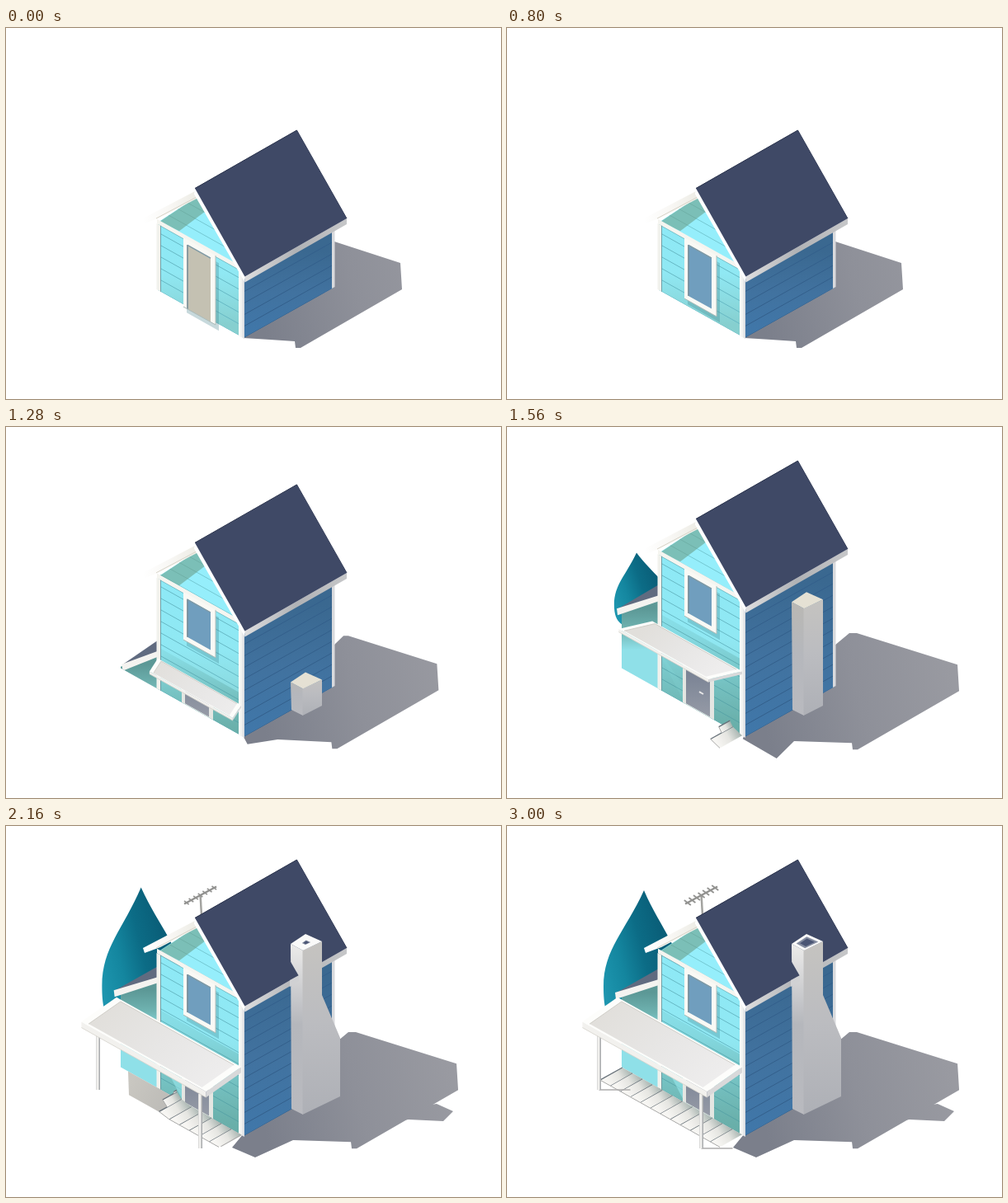
Recreate the animation shown at these times as an HTML page with a canvas. Size 600 px wide and 450 px high, loop 4000 ms.

```html
<!DOCTYPE html>
<html lang="en">
<head>
<meta charset="utf-8">
<title>Little house</title>
<style>
html, body { margin: 0; width: 100%; height: 100%; overflow: hidden; background: #fff; }
canvas { display: block; width: 600px; height: 450px; }
</style>
</head>
<body>
<canvas id="stage" width="600" height="450"></canvas>
<script>
const ctx = document.getElementById('stage').getContext('2d');
const LOOP = 4000, STEP = 40, END = 3000;
const SLOPE = .56, FRONT = 104, SIDE = 109, LIFT = 83;

const clamp = v => Math.max(0, Math.min(1, v));
const mix = (a, b, k) => a + (b - a) * k;
const ramp = (t, a, b) => clamp((t - a) / (b - a));
const smooth = (t, a, b) => { const k = ramp(t, a, b); return k * k * (3 - 2 * k); };
const easeOut = (t, a, b) => 1 - (1 - ramp(t, a, b)) ** 2;
const bump = (t, a, b) => Math.sin(Math.PI * ramp(t, a, b));
// Overshoots by about a tenth before settling.
const pop = (t, a, b) => { const u = ramp(t, a, b) - 1; return 1 + 2.7 * u ** 3 + 1.7 * u ** 2; };

// The origin is the near house corner: u runs along the front, v along the side, z up.
const iso = (u, v, z) => [288 + u + v, 376 + SLOPE * (u - v) - z];
const frontRect = (u0, u1, z0, z1) => [iso(u0, 0, z0), iso(u0, 0, z1), iso(u1, 0, z1), iso(u1, 0, z0)];
const sideRect = (v0, v1, z0, z1) => [iso(0, v0, z0), iso(0, v0, z1), iso(0, v1, z1), iso(0, v1, z0)];
const add = ([x, y], [dx, dy]) => [x + dx, y + dy];

function grad(x0, y0, x1, y1, ...colors) {
  const g = ctx.createLinearGradient(x0, y0, x1, y1);
  colors.forEach((c, i) => g.addColorStop(i / (colors.length - 1), c));
  return g;
}
const vertical = (y0, y1, ...colors) => grad(0, y0, 0, y1, ...colors);

function trace(points) {
  ctx.beginPath();
  points.forEach(p => ctx.lineTo(...p));
  ctx.closePath();
}

function poly(fill, points) {
  trace(points);
  ctx.fillStyle = fill;
  ctx.fill();
}

function line(color, width, a, b) {
  ctx.strokeStyle = color;
  ctx.lineWidth = width;
  ctx.beginPath();
  ctx.moveTo(...a);
  ctx.lineTo(...b);
  ctx.stroke();
}

// Fills a wall and rules its boards, counted up from the foot.
function boards(fill, seam, points, along) {
  ctx.save();
  trace(points);
  ctx.clip();
  ctx.fillStyle = fill;
  ctx.fillRect(0, 0, 600, 450);
  for (let z = 0; z < 240; z += 14) line(seam, 1, iso(0, 0, z), along(z));
  ctx.restore();
}

// The porch roof starts as a hanging flap that climbs, swings up and settles.
function porchPose(t) {
  const reach = ramp(t, 1160, 1520), p = ramp(t, 1280, 1680);
  const degrees = mix(-45, -8, p) + 46 * bump(t, 1280, 1680);
  return {
    degrees, reach,
    height: 82 * easeOut(t, 1140, 1680),
    spread: smooth(t, 1520, 1680),
  };
}

function groundShadow(t, rise) {
  const { reach, degrees, spread } = porchPose(t);
  const p = rise / LIFT;
  const cast = (x, y) => [x + rise * .82, y + rise * .04];
  const fill = grad(310, 355, 540, 300, '#7b7f8b', '#8e9099', '#999aa1');
  const lift = Math.max(0, degrees + 8);
  poly(fill, [iso(0, 0, 3), [288 - 14 * spread, 376 + 14 * spread],
    [288 + 14 * reach + .95 * lift, 376 + 26 * reach], [320 + 28 * reach, 378 + 3 * reach],
    cast(350, 380), cast(351, 388), cast(357, 388), cast(480, 317), cast(478, 285),
    [398 + 26 * p, 259 - 9 * p], [398 + 17 * p, 259 - 9 * p], iso(0, SIDE, 50), iso(0, SIDE, 0)]);
  const k = smooth(t, 1580, 1880);
  if (k) poly(fill, [[480, 357], [488, 356], [mix(505, 530, k), mix(345, 358, k)],
    [mix(508, 542, k), mix(343, 346, k)], [522, 337], [500, 340]]);
}

function tree(t) {
  const grow = pop(t, 1445, 2265);
  if (grow < .02) return;
  const foot = 240, h = 162 * grow, top = foot - h, bulge = foot - .28 * h;
  const tip = mix(157, 166, smooth(t, 1920, 2280));
  const half = 20 + 28 * grow, left = 165 - half, right = 165 + half;
  ctx.fillStyle = grad(left, bulge, right - 15, bulge - 20, '#1d95ae', '#14869f', '#0c6c86', '#0a5f79');
  ctx.beginPath();
  ctx.moveTo(tip, top);
  ctx.bezierCurveTo(mix(tip, left, .45), mix(top, bulge, .42), left, bulge - .28 * h, left, bulge);
  ctx.bezierCurveTo(left, foot, left + 12, foot + 4, 165, foot + 4);
  ctx.bezierCurveTo(right - 12, foot + 4, right, foot, right, bulge);
  ctx.bezierCurveTo(right, bulge - .28 * h, mix(tip, right, .45), mix(top, bulge, .42), tip, top);
  ctx.fill();
}

function antenna(t) {
  const grow = pop(t, 1700, 2000);
  if (grow < .02) return;
  const tilt = -.06 - .42 * (1 - smooth(t, 1900, 2140));
  const base = [237, 108];
  const hub = add(base, [24 * grow * Math.sin(tilt), -24 * grow * Math.cos(tilt)]);
  const arm = k => add(hub, [39 * k * grow, -21 * k * grow]);
  line('#a3a3a0', 2.5, base, hub);
  line('#91918f', 2.2, arm(-.5), arm(.5));
  const reach = smooth(t, 1880, 2320);
  for (let i = 0; i < 7; i++) {
    const at = arm((i - 3) / 7);
    line('#91918f', 1.7, add(at, [-4 * reach, -3 * reach]), add(at, [4 * reach, 3 * reach]));
  }
}

function leanTo(t) {
  if (t < 1140) return;
  const drop = 104 * (1 - smooth(t, 1120, 1720)) - 7 * bump(t, 1640, 2240);
  const x = 131 + drop * .11, y = 202 + drop;
  ctx.save();
  trace([[100, 0], [188, 0], iso(-100, 0, 0), iso(-149, 0, 0), [100, 292]]);
  ctx.clip();
  poly(vertical(y, y + 50, '#5c9896', '#6fb3b1', '#8fe0e8'),
    [[139, y + 3], [185, y - 16], [185, 330], [139, 330]]);
  poly('#606b80', [[x, y + 1], [184, y - 29], [184, y - 13]]);
  poly('#f4f3f0', [[x, y], [184, y - 16], [184, y - 9], [x + 1, y + 8]]);
  ctx.restore();
}

function sideWall(rise) {
  const top = 71 + rise;
  boards(vertical(270 - rise, 370, '#3a6890', '#41729f', '#4077a9'), '#335f8b',
    sideRect(0, SIDE, 0, top), z => iso(0, SIDE, z));
  poly('#d9dadd', sideRect(SIDE - 2, SIDE + 1.5, 0, top));
}

function frontWall(t, rise) {
  const top = 80 + rise, at = (u, z) => iso(u, 0, z + rise);
  const ridge = [231, 205 - rise];
  boards(vertical(235 - rise, 360, '#8de9f6', '#90e8f3', '#86cfcf'), '#66b8c4',
    frontRect(-FRONT, -3, 0, top), z => iso(-FRONT, 0, z));

  const shade = smooth(t, 1120, 1300);
  if (shade) {
    const { height, spread } = porchPose(t);
    poly(vertical(375 - height - 60, 375, `rgba(60,125,112,${.1 * shade})`, `rgba(60,125,112,${.42 * shade})`),
      frontRect(-FRONT, -3, 0, height + 14));
    poly(`rgba(155,235,240,${.55 * spread})`, [iso(-100, 0, 44), iso(-74, 0, 20), iso(-74, 0, 2), iso(-100, 0, 38)]);
  }

  boards('#95eefb', '#74c8d2', [at(-FRONT, 82), ridge, at(-7, 84)], z => iso(-FRONT, 0, z));
  poly('rgba(108,160,138,.6)', [at(-102, 84), ridge, [242, 222 - rise], at(-78, 86)]);
  poly(grad(166, 0, 232, 0, '#ffffff', '#f8f7f4', '#edece5'),
    [[166, 231], [229, 198], [233, 206], [187, 230], [168, 237]].map(p => add(p, [0, -rise])));
  line('#d8d4c8', 1, [182, 231 - rise], ridge);
  poly('#f5f5f0', frontRect(-105, -5, top, top + 5.5));
  line('rgba(70,130,135,.4)', 1, at(-FRONT, 79.5), at(-5, 79.5));
  poly('#f2f2ed', frontRect(-105.5, -100.5, 0, top));
  line('#5b8d96', .8, iso(-100.5, 0, 0), at(-100.5, 80));
  poly(grad(282, 0, 289, 0, '#fdfdfb', '#f2f2f0', '#d5d9df'), frontRect(-6, 1, -.5, 80 + rise));
}

function windowFrame(t, rise) {
  const sill = smooth(t, 160, 560), top = 81 + rise;
  const bottom = top - 58 - 16 * (1 - smooth(t, 800, 1200)) - 10 * (1 - sill);
  const k = smooth(t, 80, 560);
  const glass = [[196, 112], [193, 158], [178, 190]].map(([a, b]) => Math.round(mix(a, b, k)));
  poly('rgba(55,120,130,.28)', frontRect(-69, -30, bottom - 5, top - 7));
  poly('#f9f9f5', frontRect(-73, -34, bottom, top));
  const inner = z => bottom + 6 * sill + z;
  poly(`rgb(${glass})`, frontRect(-68.5, -40, inner(0), top - 6));
  line('#788e98', 1.6, iso(-68, 0, inner(0)), iso(-68, 0, top - 6));
  line('#7f9aa5', 1.4, iso(-68, 0, top - 6.5), iso(-40, 0, top - 6.5));
  line('#b7c0bc', 1, iso(-34, 0, bottom), iso(-34, 0, top));
  line('#a9bab8', sill, iso(-73, 0, bottom), iso(-34, 0, bottom));
}

function door(t) {
  const h = 48 * smooth(t, 1120, 1420);
  if (!h) return;
  poly('#e4e6e2', frontRect(-75, -37, 0, h));
  poly(vertical(300, 350, '#7b8495', '#959aa6'), frontRect(-71, -42, 1, h - 3));
  if (h > 40) line('#e7e7e7', 2, iso(-55, 0, 24), iso(-50, 0, 24));
}

function roof(rise) {
  const ridge = [229, 194.5 - rise], eave = [289.5, 301.5 - rise], depth = [123.5, -70.5];
  const down = p => add(p, [0, 7]);
  const farEave = add(eave, depth), farRidge = add(ridge, depth);
  poly('#ffffff', [ridge, eave, down(eave), add(ridge, [-1, 7])]);
  poly(grad(289, 0, 414, 0, '#dededf', '#b0b2b5', '#c6c7c9'), [eave, farEave, down(farEave), down(eave)]);
  poly('#3f4966', [ridge, farRidge, farEave, eave]);
  line('#252e48', 1, ridge, farRidge);
  line('#343d59', 1, farRidge, farEave);
}

function chimney(t) {
  if (t < 1140) return;
  const top = mix(346, 131, ramp(t, 1140, 1760));
  const flare = 22 * smooth(t, 1600, 2040), lit = top < 170;
  const edge = 383 + flare;
  poly(vertical(top, 350, lit ? '#f3f2f0' : '#bab8b2', '#b5b7bc', '#b9babf'),
    [[345, top + 12], [360, top + 20], [360, 350], [346, 343]]);
  poly(vertical(top, 350, '#c6c4c0', '#bbbcc0', '#aeb0b6'),
    [[359.5, top + 20], [383, top + 9], [383, Math.min(337, Math.max(205, top + 20))],
      [edge, Math.min(337, Math.max(257, top + 40))], [edge, 338 - flare * .46], [359.5, 350]]);
  const rim = k => [[-19, 1.5], [-1, -10.5], [19, -1.5], [-4, 9.5]].map(([x, y]) => [364 + x * k, top + 10.5 + y * k]);
  poly(lit ? '#fafaf9' : '#e5e1d4', rim(1));
  const hole = smooth(t, 2040, 2320);
  poly('#848ca0', rim(.7 * hole));
  poly('#4a5574', rim(.47 * hole));
  // The eave passes in front of the lit face.
  if (lit) {
    poly('#3f4966', [[344, 163], [355, 182], [344, 189]]);
    poly('#d0d1d3', [[344, 187], [355, 181], [355, 188], [344, 195]]);
  }
}

// The deck unrolls board by board along the wall.
function deck(t) {
  ctx.globalAlpha = smooth(t, 1560, 1860) * (1 - smooth(t, 2160, 2440));
  poly(grad(150, 310, 270, 380, '#c9c7c1', '#aaa9a8'),
    [iso(-140, 0, 0), iso(-2, 0, 0), iso(-2, -25, 0), iso(-114, -25, 0)]);
  ctx.globalAlpha = 1;
  const front = (t - 1560) * .0088;
  let u = -3, z = 0;
  for (let i = 0; i < 12 && front > -1; i++) {
    const size = clamp((front + 2 - i) / 2);
    if (!size) break;
    const angle = Math.min(2.3, .6 * Math.max(0, i + .6 - front));
    const next = u - 12.1 * size * Math.cos(angle), up = z + 13 * size * Math.sin(angle);
    const width = -27 * size;
    const a = iso(u, 0, z), b = iso(u, width, z), c = iso(next, width, up), d = iso(next, 0, up);
    poly(grad(...b, ...a, '#f7f6f3', '#e5e5e1', '#a5b2ae'), [a, b, c, d]);
    line('#68727a', 1.3, c, d);
    line('#a9a9a8', 1, b, c);
    u = next;
    z = up;
  }
}

function porchPosts(t) {
  if (t < 1680) return;
  const angle = 70 * Math.PI / 180 * (1 - smooth(t, 1680, 2160));
  const length = 66 * easeOut(t, 1640, 2160);
  const shadow = ramp(t, 2200, 2320);
  for (const top of [[111.5, 254], [235.5, 325]]) {
    const foot = add(top, [Math.sin(angle) * length, Math.cos(angle) * length]);
    if (shadow) line('#acabab', 1.6, foot, add(foot, [38 * shadow, 0]));
    line('#a9abad', 5, top, foot);
    line('#f1f0ee', 3.2, add(top, [-.6, 0]), add(foot, [-.6, 0]));
  }
}

function porchRoof(t) {
  if (t < 1140) return;
  const { degrees, reach, height, spread } = porchPose(t);
  const angle = degrees * Math.PI / 180, size = 43 * reach;
  const out = -size * Math.cos(angle), z = height + size * Math.sin(angle);
  const left = -FRONT - 50 * spread, drop = 3 + 4 * spread;
  const corners = [iso(left, 0, height), iso(-3, 0, height), iso(-3, out, z), iso(left, out, z)];
  const [backLeft, backRight, frontRight, frontLeft] = corners;
  const down = p => add(p, [0, drop]);
  poly('#f2f1ee', [frontLeft, frontRight, down(frontRight), down(frontLeft)]);
  poly('#d9d9da', [frontRight, backRight, down(backRight), down(frontRight)]);
  poly('#fdfdfb', corners);
  const centre = [0, 1].map(i => (backLeft[i] + frontRight[i]) / 2);
  const inset = corners.map(p => p.map((v, i) => mix(centre[i], v, .91)));
  poly(grad(...backLeft, ...frontRight, '#e1dfdb', '#e7e6e5', '#eeeded'), inset);
  line('#d0cec8', 1, inset[0], inset[1]);
  line('#d0cec8', 1, inset[0], inset[3]);
  line('#d5d2cb', .8, down(frontLeft), down(frontRight));
}

function draw(t) {
  const rise = LIFT * smooth(t, 840, 1570);
  ctx.fillStyle = '#fff';
  ctx.fillRect(0, 0, 600, 450);
  groundShadow(t, rise);
  tree(t);
  antenna(t);
  leanTo(t);
  sideWall(rise);
  frontWall(t, rise);
  windowFrame(t, rise);
  door(t);
  roof(rise);
  chimney(t);
  deck(t);
  porchPosts(t);
  porchRoof(t);
}

const start = performance.now();
function tick() {
  const t = (performance.now() - start) % LOOP;
  draw(Math.min(END, Math.floor(t / STEP) * STEP));
  requestAnimationFrame(tick);
}
tick();
</script>
</body>
</html>
```
